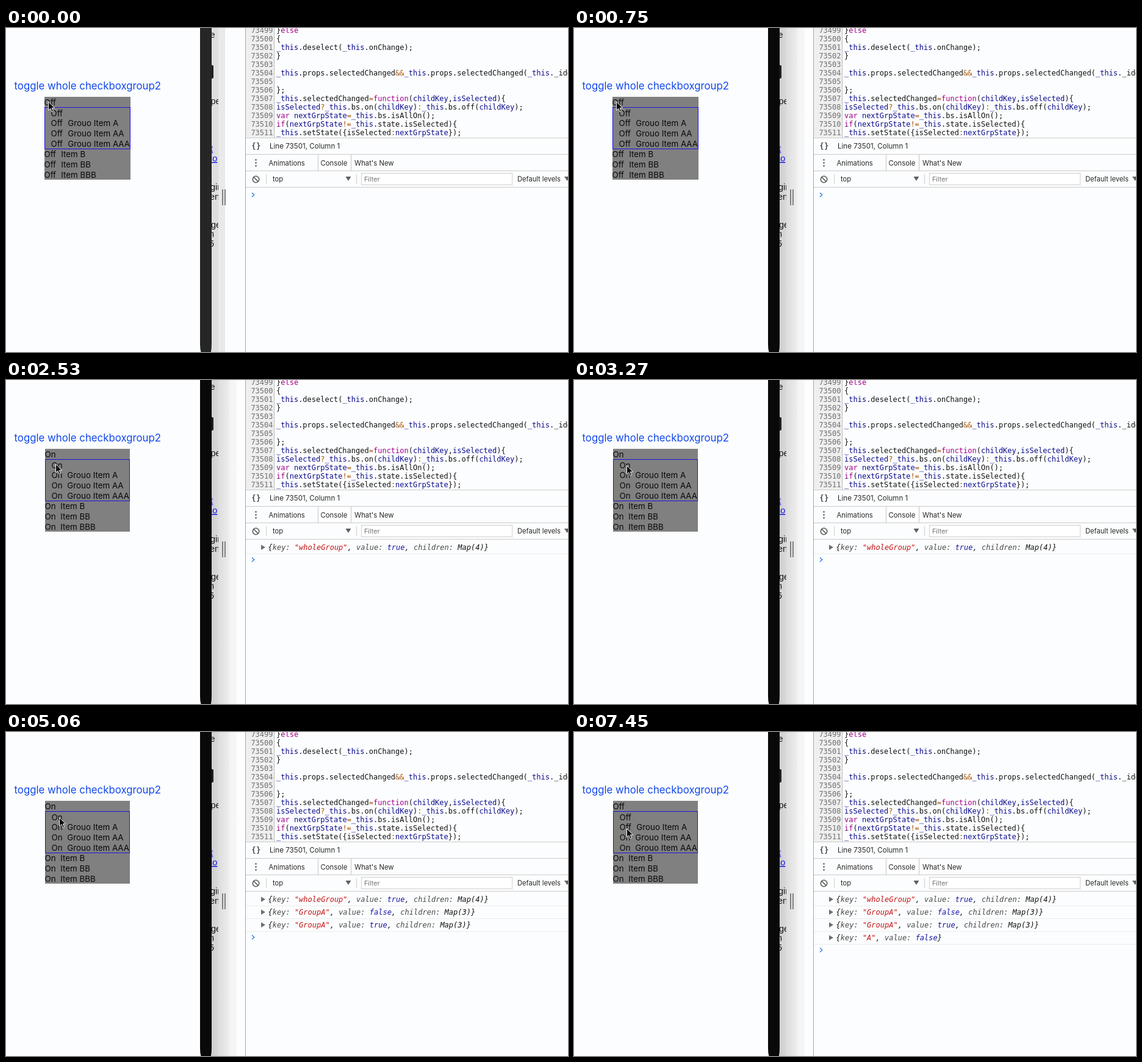
An HTML page for the animation above (8 s loop, 921x532 px).

```html
<!DOCTYPE html>
<html lang="en">
<head>
<meta charset="utf-8">
<title>Checkbox group demo</title>
<style>
  html, body { margin: 0; width: 100%; height: 100%; overflow: hidden; background: #fcfdfe; }
  svg { display: block; width: 921px; height: 532px; }
  text { white-space: pre; }
  .ui { font-family: Inter, Roboto, sans-serif; font-size: 11.3px; fill: #282828; }
  .item { font-family: Inter, Roboto, sans-serif; font-size: 13.35px; fill: #080808; }
  .title { font-family: Inter, Roboto, sans-serif; font-size: 16.8px; fill: #1148ee; }
  .page { font-family: "Liberation Sans", Arial, sans-serif; font-size: 14.5px; fill: #151515; }
  .page.link { fill: #1717d8; text-decoration: underline; }
  .code { font-family: "DejaVu Sans Mono", Menlo, monospace; font-size: 12px; fill: #111; }
  .num { fill: #707070; text-anchor: end; }
  .log { font-style: italic; }
</style>
</head>
<body>
<svg id="stage" viewBox="0 0 921 532">
  <defs>
    <linearGradient id="shade">
      <stop offset="0" stop-color="#cfcfcf"/>
      <stop offset=".27" stop-color="#d9d9d9"/>
      <stop offset=".28" stop-color="#dedede"/>
      <stop offset=".69" stop-color="#ececec"/>
      <stop offset=".7" stop-color="#f3f3f3"/>
      <stop offset="1" stop-color="#f7f7f7"/>
    </linearGradient>
    <clipPath id="strip"><rect x="330" width="18" height="532"/></clipPath>
  </defs>
</svg>
<script>
const LOOP = 8000;
const stage = document.getElementById('stage');

function add(tag, attrs, parent = stage) {
  const el = document.createElementNS('http://www.w3.org/2000/svg', tag);
  for (const k in attrs) el.setAttribute(k, attrs[k]);
  parent.appendChild(el);
  return el;
}
const rect = (x, y, width, height, fill, parent) => add('rect', { x, y, width, height, fill }, parent);
const path = (d, fill, parent) => add('path', { d, fill }, parent);
const line = (d, stroke, w = 1) => add('path', { d, stroke, 'stroke-width': w, fill: 'none' });
function text(x, y, cls, str, parent) {
  const el = add('text', { x, y, class: cls }, parent);
  el.textContent = str;
  return el;
}

// Splits a line into coloured spans; rules are [color, pattern] in order.
function colored(x, y, cls, str, rules, parent) {
  const el = add('text', { x, y, class: cls }, parent);
  while (str) {
    let color = '#111', part = str[0];
    for (const [c, re] of rules) {
      const m = str.match(re);
      if (m) { color = c; part = m[0]; break; }
    }
    add('tspan', { fill: color }, el).textContent = part;
    str = str.slice(part.length);
  }
}

const codeRules = [
  ['#9c0086', /^(else|function|var|if)\b/],
  ['#111', /^\.\w+/],
  ['#111', /^\w+(?=:)/],
  ['#0c0c8c', /^\w+/],
  ['#ad5200', /^(&&|!=|[=?:])/]
];
const logRules = [
  ['#c41212', /^"\w+"/],
  ['#1414a0', /^(true|false)/],
  ['#484848', /^\w+:/],
  ['#111', /^\w+/]
];

function drawPhone() {
  const wall = rect(337, 0, 22, 532, '#e9e9e9');
  const gap = rect(337, 0, 11, 532, '#dedede');
  const shade = rect(337, 0, 41, 532, 'url(#shade)');
  const page = add('g', { 'clip-path': 'url(#strip)' });
  rect(330, 61, 10, 22, '#222', page).setAttribute('rx', 2);
  [
    [334.5, 16, 'e'], [335.5, 125, 'pe'], [335, 203, 't', ' link'], [335, 219, 'io', ' link'],
    [335, 266, 'gin'], [334, 282, 'enc'], [336, 328, 'ge'], [333, 343, 'n'], [333, 359, '5']
  ].forEach(([x, y, s, mod = '']) => text(x, y, 'page' + mod, s, page));
  const bezel = path('M318 0H337V518Q337 526 336 532H319.5Q318 527 318 520Z', '#262626');
  rect(354, 265, 2, 26, '#808080');
  rect(358, 265, 2, 26, '#808080');
  text(13.5, 101, 'title', 'toggle whole checkboxgroup2');
  return dim => {
    bezel.setAttribute('fill', dim ? '#090909' : '#262626');
    shade.setAttribute('visibility', dim ? 'visible' : 'hidden');
    wall.setAttribute('visibility', dim ? 'hidden' : 'visible');
    gap.setAttribute('visibility', dim ? 'hidden' : 'visible');
  };
}

function drawDevtools() {
  rect(392, 0, 529, 532, '#fcfdfe');
  rect(393, 0, 46, 180, '#efefef');
  line('M439.5 0V180', '#bbb');
  [
    '}else', '{', '_this.deselect(_this.onChange);', '}', '',
    '_this.props.selectedChanged&&_this.props.selectedChanged(_this._identity);', '', '};',
    '_this.selectedChanged=function(childKey,isSelected){',
    'isSelected?_this.bs.on(childKey):_this.bs.off(childKey);',
    'var nextGrpState=_this.bs.isAllOn();',
    'if(nextGrpState!=_this.state.isSelected){',
    '_this.setState({isSelected:nextGrpState});'
  ].forEach((s, i) => {
    const y = 8 + 14 * i;
    text(437.5, y, 'code num', 73499 + i);
    colored(443, y, 'code', s, codeRules);
  });

  line('M393 180.5H921M393 207.5H921M393 234.5H921M393 261.5H921', '#cbcbcb');
  text(402, 198, 'code', '{}').style.fontSize = '13px';
  text(432, 198, 'ui', 'Line 73501, Column 1').style.fontSize = '11.6px';

  [216.5, 221.5, 226.5].forEach(cy => add('circle', { cx: 409.5, cy, r: 1.3, fill: '#555' }));
  text(430.5, 226, 'ui', 'Animations');
  rect(511, 208, 55, 26, '#fff');
  line('M511.5 208V234M565.5 208V234', '#c4c4c4');
  text(515.5, 226, 'ui', 'Console');
  text(571, 226, 'ui', "What's New");

  add('circle', { cx: 409.5, cy: 248.5, r: 5.2, fill: 'none', stroke: '#555', 'stroke-width': 1.5 });
  line('M405.8 244.8L413.2 252.2', '#555', 1.5);
  line('M426.5 240V256M574.5 240V256', '#ccc');
  text(437, 252, 'ui', 'top');
  path('M556.5 244H565.5L561 251Z', '#5f5f5f');
  add('rect', { x: 582.5, y: 238.5, width: 247, height: 19, fill: '#fff', stroke: '#cfcfcf' });
  const hint = text(587, 252, 'ui', 'Filter');
  hint.style.fill = '#757575';
  hint.style.fontSize = '10.8px';
  text(838, 252, 'ui', 'Default levels').style.fontSize = '11.1px';
  path('M915 244H924L919.5 251Z', '#5f5f5f');
  line('M392.5 0V532', '#a6a6a6');

  const rows = [
    '{key: "wholeGroup", value: true, children: Map(4)}',
    '{key: "GroupA", value: false, children: Map(3)}',
    '{key: "GroupA", value: true, children: Map(3)}',
    '{key: "A", value: false}'
  ].map((s, i) => {
    const g = add('g', { transform: `translate(0 ${21 * i})` });
    rect(393, 285, 528, 1, '#ececec', g);
    path('M418 270.5L425 274.8L418 279Z', '#6e6e6e', g);
    colored(429.5, 279, 'code log', s, logRules, g);
    return g;
  });
  const prompt = line('M403 270.5L406.7 274L403 277.5', '#3d82e6', 1.5);
  return count => {
    rows.forEach((g, i) => g.setAttribute('visibility', i < count ? 'visible' : 'hidden'));
    prompt.setAttribute('transform', `translate(0 ${21 * count})`);
  };
}

function drawList() {
  const labels = ['', '', 'Grouo Item A', 'Grouo Item AA', 'Grouo Item AAA', 'Item B', 'Item BB', 'Item BBB'];
  const back = rect(63, 113, 141, 136, '#808080');
  const frame = add('rect', { y: 130.5, height: 68, fill: 'none', stroke: '#1c14dc' });
  const rows = labels.map((label, i) => {
    const inGroup = i > 0 && i < 5;
    const y = 126.8 + 16.7 * i + (inGroup ? 1 : i > 4 ? 2 : 0);
    return { indent: inGroup ? 11 : 0, state: text(0, y, 'item', ''), name: text(0, y, 'item', label) };
  });
  return bits => {
    const wide = bits[4] === '0';
    const left = wide ? 63 : 64, width = wide ? 141 : 139;
    back.setAttribute('x', left);
    back.setAttribute('width', width);
    frame.setAttribute('x', left + 0.5);
    frame.setAttribute('width', width - 1);
    rows.forEach(({ indent, state, name }, i) => {
      const on = bits[i] === '1';
      state.textContent = on ? 'On' : 'Off';
      state.setAttribute('x', left + indent - 0.5);
      name.setAttribute('x', left + indent + (on ? 25.3 : 27.3));
    });
  };
}

const setDim = drawPhone();
const setLog = drawDevtools();
const setList = drawList();
const pointer = add('path', {
  d: 'M0 0V14.2L3.3 11.2L5.7 16.5L8.1 15.4L5.7 10.4H10.2Z',
  fill: '#080808', stroke: '#f4f4f4', 'stroke-width': 1
});

// [time, dimmed, switch states, log rows]
const states = [
  [0, false, '00000000', 0],
  [600, true, '00000000', 0],
  [900, true, '11111111', 1],
  [3720, true, '00000111', 2],
  [5060, true, '11111111', 3],
  [7450, true, '00011111', 4]
];

// [time, x, y]
const moves = [
  [0, 69.5, 121], [1800, 72, 126], [1945, 77, 134], [2090, 79.5, 138],
  [2530, 81.5, 138], [2680, 82.5, 138.5], [2830, 83.5, 139], [2975, 84.5, 139.5],
  [3125, 85.5, 140], [3270, 86.5, 140.5], [3420, 87.5, 140.5],
  [5660, 87.5, 142], [5810, 87.5, 146], [5955, 87.5, 151], [6100, 87.5, 154], [6250, 87.5, 156.5],
  [6550, 87.5, 158], [6700, 87.5, 158.5], [7000, 86.5, 158.5]
];

const at = (table, t) => table.findLast(step => step[0] <= t);
let shown, spot;

function tick() {
  const t = performance.now() % LOOP;
  const state = at(states, t), move = at(moves, t);
  if (state !== shown) {
    shown = state;
    setDim(state[1]);
    setList(state[2]);
    setLog(state[3]);
  }
  if (move !== spot) {
    spot = move;
    pointer.setAttribute('transform', `translate(${move[1]} ${move[2]})`);
  }
  requestAnimationFrame(tick);
}
tick();
</script>
</body>
</html>
```
